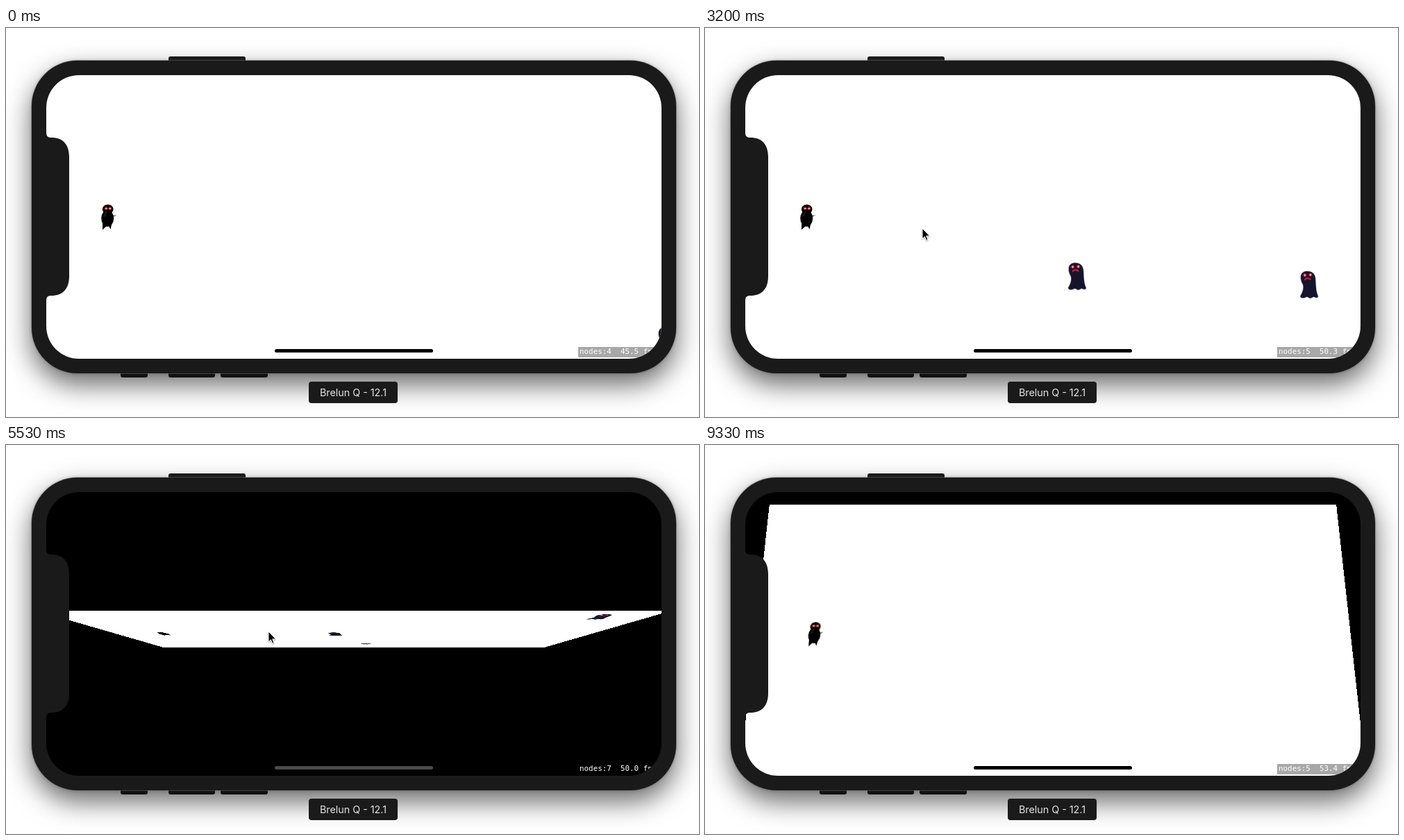
Animation, 998 px wide and 561 px high, one loop 9400 ms. Source, as an HTML page:

```html
<!DOCTYPE html>
<html lang="en">
<head>
<meta charset="utf-8">
<title>Ghost game</title>
<style>
html, body { margin: 0; width: 100%; height: 100%; overflow: hidden; background: #fff; }
body > *, .scene { position: absolute; }
#phone { left: 37px; top: 47px; width: 928px; height: 451px; border-radius: 66px; background: #1a1a1a;
  box-shadow: 0 0 0 .6px #777, 0 16px 38px rgba(0,0,0,.6), 0 0 4px rgba(0,0,0,.25); }
.key { height: 10px; border-radius: 3px; background: #202020; }
#screen { left: 58px; top: 68px; width: 886px; height: 409px; border-radius: 47px; overflow: hidden;
  background: #000; perspective: 619px; }
.scene { left: 0; top: 0; width: 100%; height: 100%; background: #fff; }
#stats { position: absolute; left: 766px; top: 392px; width: 120px; height: 15px; padding-left: 2px; box-sizing: border-box;
  background: rgba(0,0,0,.34); color: #fff; font: 10.88px/14px "DejaVu Sans Mono", monospace; white-space: pre; }
#bar { position: absolute; left: 329px; top: 394.5px; width: 228px; height: 5.5px; border-radius: 3px; background: #000; }
#label { left: 436px; top: 510px; width: 128px; height: 31px; border-radius: 4px; background: #1a1a1a; color: #e4e4e4;
  font: 14.3px/31px Inter, sans-serif; text-align: center; white-space: pre; }
#front { left: 0; top: 0; width: 998px; height: 561px; }
</style>
</head>
<body>
<div class="key" style="left:234px;top:41px;width:111px"></div>
<div class="key" style="left:165px;top:494px;width:39px"></div>
<div class="key" style="left:234px;top:494px;width:67px"></div>
<div class="key" style="left:309px;top:494px;width:68px"></div>
<div id="phone"></div>
<div id="screen">
  <svg class="scene" id="game" viewBox="58 68 886 409">
    <defs>
      <g id="ghost">
        <path fill="#14152d" stroke="#c9cad4" stroke-width=".5" d="M-13.5 17C-10 11-8 6-9.500 0C-12-4-13-8-12.500-12
          C-12-17-8-19.500-3-19.500C4-19.500 8-16 9-9C10 0 9 8 13 17q-1 3-4 2q-3-2-5 0q-3 2-5 0q-3-2-5 0q-6 2-7.500-2z"/>
        <g fill="#fff" stroke="#e8203a" stroke-width="1.500"><circle cx="-6.500" cy="-13.500" r="1.700"/><circle cx="1.500" cy="-14" r="1.700"/></g>
        <path fill="none" stroke="#d8182c" stroke-width="2.200" d="M-7-6.500Q-3-11.500 2-7"/>
      </g>
      <g id="star"></g>
    </defs>
    <g id="hero">
      <path fill="#777" d="M150 271L159.500 269.600L154 273.500z"/>
      <path d="M139 281L139 291L145 285.500H148L150.500 290.500L153 279z"/>
      <ellipse cx="146.200" cy="274.500" rx="9" ry="12"/>
      <ellipse cx="146.700" cy="261.500" rx="7.800" ry="7"/>
      <path fill="none" stroke="#444" stroke-width=".9" d="M145 265L141 272"/>
      <g fill="#fff" stroke="#e3243f" stroke-width="1.300"><ellipse cx="144.200" cy="260.300" rx="1.800" ry="1.400"/><ellipse cx="149.800" cy="260.300" rx="1.800" ry="1.400"/></g>
    </g>
  </svg>
  <svg class="scene" id="over" viewBox="58 68 886 409" role="img" aria-label="You lose :(">
    <filter id="chalk" x="-5%" y="-20%" width="110%" height="140%">
      <feTurbulence type="fractalNoise" baseFrequency=".45" numOctaves="2" seed="4"/>
      <feDisplacementMap in="SourceGraphic" scale="5" xChannelSelector="R" yChannelSelector="G"/>
    </filter>
    <g fill="none" stroke="#000" stroke-width="5" stroke-linecap="round" stroke-linejoin="round" filter="url(#chalk)">
      <path d="M369 241.500Q375 247 386 251M400 240Q390 255 378 271"/>
      <ellipse cx="413" cy="261.500" rx="10.500" ry="9"/>
      <path d="M434 252C430 267 437 273 445 268Q452 263 454 252Q451 269 458 270"/>
      <path d="M489 240L487 269Q491 272 497 270"/>
      <ellipse cx="514" cy="261.500" rx="10.500" ry="9"/>
      <path d="M550 253C541 250 534 254 537 259C541 263 552 262 550 267C548 272 539 271 533 270"/>
      <path d="M560 262L577 259C577 252 569 249 563 254C555 262 560 271 568 271Q574 271 579 268"/>
      <path stroke-width="7" d="M610 253v.1M609 269v.1"/>
      <path d="M629 236C618 249 619 269 634 279"/>
    </g>
  </svg>
  <div id="stats"></div>
  <div id="bar"></div>
</div>
<div id="label">Brelun Q - 12.1</div>
<svg id="front" viewBox="0 0 998 561">
  <path fill="#1a1a1a" d="M56 150H58C58 156 60 158 65 158C82 158 91 168 91 186V358C91 376 82 386 65 386C60 386 58 388 58 394H56z"/>
  <path id="cursor" stroke="#fff" stroke-width="1" style="filter:drop-shadow(0 1px 1px rgba(0,0,0,.4))"
    d="M0 0V15L3.400 11.800L5.800 17.300L8 16.300L5.700 10.900H10.500z"/>
</svg>
<script>
const LOOP = 9.4, FLIP = .49, LOSE = 5.313, RESTART = 8.868;
const $ = id => document.getElementById(id);
const HERO = { x: 147, y: 272 };

// spawn time, speed, height, end time
const ghosts = [
  [-.02, 241, 451, 2.17], [.98, 324, 267, 3.03], [1.98, 345, 358, 3.68],
  [2.98, 394, 370, 5.3], [3.98, 368, 275, 9], [4.98, 258, 110.5, 9]];
// start time, aim x, aim y, end time
const shots = [
  [1.605, 393, 436, 2.17], [2.799, 313, 289, 3.03],
  [3.303, 327, 334, 3.68], [4.572, 327, 336.5, 6.57]];
// time, x, y
const mouse = [
  [.2, 144, 512], [1, 393, 436], [2.2, 393, 436], [2.7, 313, 289], [3.2, 313, 289],
  [3.3, 327, 334], [5, 327, 334], [5.5, 378, 269], [6.5, 378, 269], [6.92, 448, 492]];
const rates = [[0, '45.5'], [1, '53.0'], [2, '50.3'], [4, '44.6'], [5, '50.0'], [8.9, '53.4']];

let blades = '';
for (let a = 0; a < 360; a += 60)
  blades += `<g transform="rotate(${a})"><circle cx="6.3" r="4.6" fill="#3c3c3c"/>
    <path d="M2 1Q6-5 10-1M3 2Q6-2 9 1.500" fill="none" stroke="#bbb" stroke-width=".8"/></g>`;
$('star').innerHTML = blades + '<circle r="2.600" fill="#000" stroke="#999" stroke-width=".7"/>';

const addSprite = id => {
  const use = document.createElementNS('http://www.w3.org/2000/svg', 'use');
  use.setAttribute('href', '#' + id);
  $('game').append(use);
  return use;
};
const ghostSprites = ghosts.map(() => addSprite('ghost'));
const shotSprites = shots.map(() => addSprite('star'));

function place(el, shown, x, y) {
  el.style.display = shown ? '' : 'none';
  if (shown) el.setAttribute('transform', `translate(${x} ${y})`);
  return shown ? 1 : 0;
}

function drawGame(t) {
  let nodes = 3;
  ghosts.forEach(([start, speed, y, end], i) =>
    nodes += place(ghostSprites[i], t >= start && t < end, 957 - speed * (t - start), y));
  shots.forEach(([start, ax, ay, end], i) => {
    const dx = ax - HERO.x, dy = ay - HERO.y, k = 545 * (t - start) / Math.hypot(dx, dy);
    nodes += place(shotSprites[i], t >= start && t < end, HERO.x + dx * k, HERO.y + dy * k);
  });
  return nodes;
}

function drawMouse(t) {
  const i = mouse.findIndex(m => m[0] > t);
  if (i < 1) return place($('cursor'), false);
  const [t0, x0, y0] = mouse[i - 1], [t1, x1, y1] = mouse[i];
  const u = (t - t0) / (t1 - t0), e = u * u * (3 - 2 * u);
  place($('cursor'), true, x0 + (x1 - x0) * e, y0 + (y1 - y0) * e);
}

function draw(t) {
  const late = t > 7;
  const p = Math.min(1, Math.max(0, (t - (late ? RESTART : LOSE)) / FLIP));
  const flipping = p > 0 && p < 1;
  const showGame = late === (p >= .5);
  const count = drawGame(late ? t - LOOP : Math.min(t, LOSE));

  $('game').style.display = showGame ? '' : 'none';
  $('over').style.display = showGame ? 'none' : '';
  const depth = 409 * Math.min(p, 1 - p), angle = 180 * (p < .5 ? -p : 1 - p);
  const turn = flipping ? `translateZ(${-depth}px) rotateX(${angle}deg)` : 'none';
  $('game').style.transform = $('over').style.transform = turn;

  const nodes = flipping ? (late ? 5 : 7) : showGame ? count : 2;
  $('stats').textContent = `nodes:${nodes}  ${rates.filter(r => r[0] <= t).pop()[1]} fps`;
  $('bar').style.background = p > .2 && p < .9 ? '#4a4a4a' : '#000';
  drawMouse(t);
}

let begin;
function tick(now) {
  begin ??= now;
  const ms = (now - begin) % (LOOP * 1000);
  draw(Math.floor((ms + 3.5) * .015) % 141 / 15);
  requestAnimationFrame(tick);
}
draw(0);
requestAnimationFrame(tick);
</script>
</body>
</html>
```
